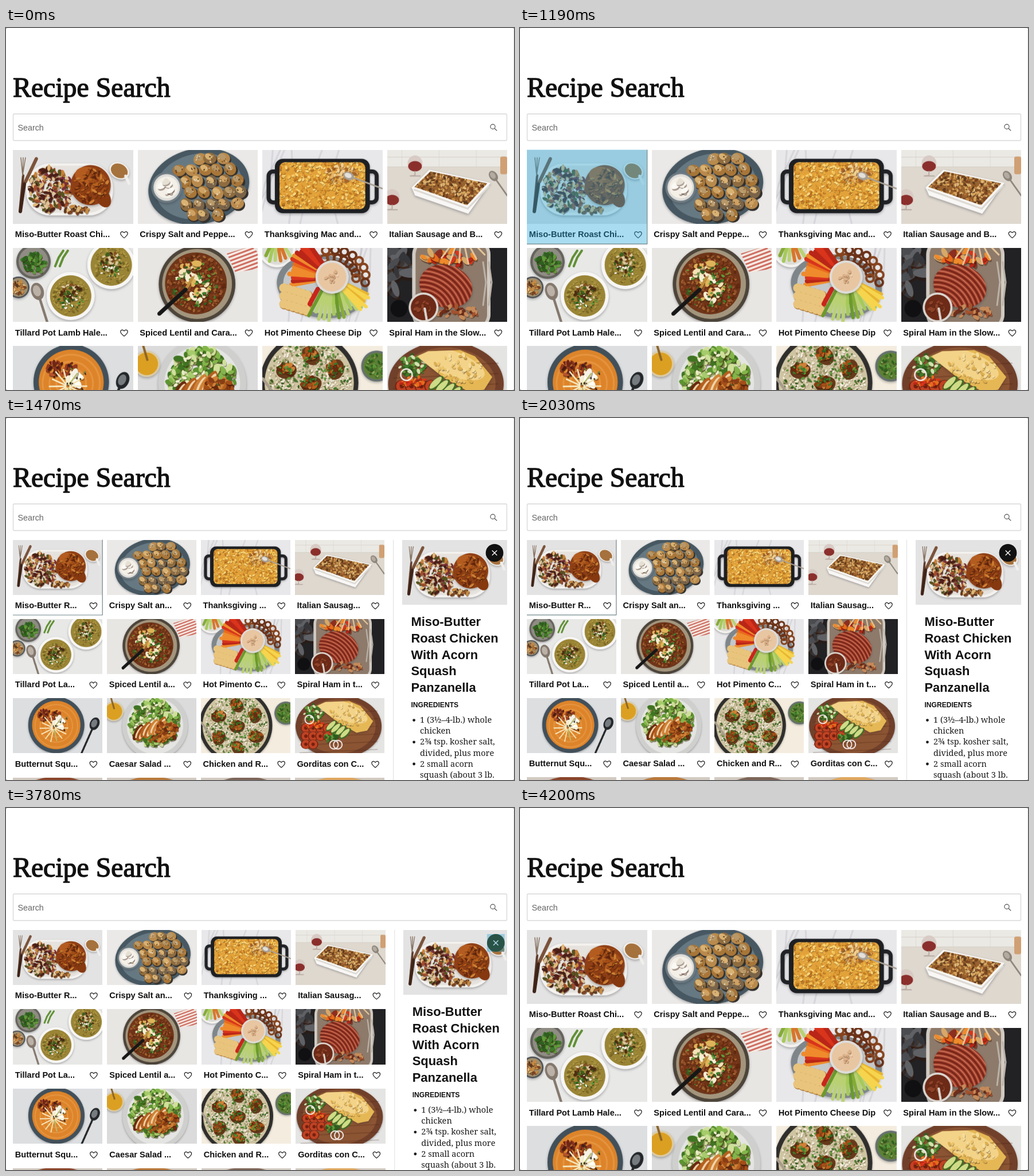
An HTML page with a canvas for the animation above (4830 ms loop, 886 by 632 pixels).

```html
<!DOCTYPE html>
<html lang="en">
<head>
<meta charset="utf-8">
<title>Recipe Search</title>
<style>
html, body { margin: 0; width: 100%; height: 100%; overflow: hidden; background: #fff; }
canvas { display: block; width: 886px; height: 632px; }
</style>
</head>
<body>
<canvas id="stage" width="886" height="632"></canvas>
<script>
const stage = document.getElementById('stage').getContext('2d');
const LOOP = 4830, STEP = 70, TAU = Math.PI * 2;
const SANS = '"Liberation Sans", Arial, sans-serif';
const SERIF = '"Noto Serif", Georgia, serif';
let c = stage, seed = 1;

// ---- basic shapes ----
const rnd = () => (seed = (seed * 16807) % 2147483647) / 2147483647;
const pick = list => list[Math.floor(rnd() * list.length)];

function ell(x, y, rx, ry, fill, rot = 0) {
  c.fillStyle = fill;
  c.beginPath();
  c.ellipse(x, y, rx, ry, rot, 0, TAU);
  c.fill();
}
function ring(x, y, r, color, width) {
  c.strokeStyle = color;
  c.lineWidth = width;
  c.beginPath();
  c.arc(x, y, r, 0, TAU);
  c.stroke();
}
function box(x, y, w, h, r, fill) {
  c.fillStyle = fill;
  c.beginPath();
  c.roundRect(x, y, w, h, r);
  c.fill();
}
function line(color, width, ...p) {
  c.strokeStyle = color;
  c.lineWidth = width;
  c.beginPath();
  for (let i = 0; i < p.length; i += 2) c.lineTo(p[i], p[i + 1]);
  c.stroke();
}
function poly(fill, ...p) {
  c.fillStyle = fill;
  c.beginPath();
  for (let i = 0; i < p.length; i += 2) c.lineTo(p[i], p[i + 1]);
  c.fill();
}
function scoped(draw) {
  c.save();
  draw();
  c.restore();
}
function shadow(draw) {
  scoped(() => {
    c.shadowColor = 'rgba(40,40,50,.35)';
    c.shadowBlur = 9;
    c.shadowOffsetY = 4;
    draw();
  });
}

// ---- kitchen parts, on a 210 x 129.5 plane ----
const W = 210, H = 129.5;
const herbs = ['#3f7a2a', '#5f9a3a', '#2f5f20'];
const roasted = ['#8a3d14', '#b5601f', '#cf8136', '#6b2a0e', '#a44e18'];
const golden = ['#f4c355', '#eeb040', '#c97c22', '#f9d67c', '#dc9630'];
const crust = ['#c48a45', '#7c4522', '#dfb777', '#a3622c', '#5d3a1e'];
const reds = ['#d9341c', '#e86b1d', '#b92617', '#ef8b2c'];
const creams = ['#f5eddb', '#fbf6ea', '#e6d3a8'];
const greens = ['#86ab38', '#b9d173', '#6b9a2c', '#a6c95a'];

function table(color) {
  box(0, 0, W, H, 0, color);
}
function marble() {
  table('#e8e8ea');
  for (let i = 0; i < 6; i++) {
    const x = rnd() * W;
    line('rgba(150,150,165,.22)', 3, x, 0, x + 20 - rnd() * 50, 60, x - rnd() * 50, H);
  }
}
// random pieces inside an ellipse, each with a dark lower edge
function heap(n, x, y, rx, ry, size, colors, flat = 0.6) {
  for (let i = 0; i < n; i++) {
    const a = rnd() * TAU, d = Math.sqrt(rnd()), s = size * (0.6 + rnd() * 0.7);
    const px = x + Math.cos(a) * d * rx, py = y + Math.sin(a) * d * ry, rot = rnd() * 3;
    ell(px + s * 0.15, py + s * 0.3, s, s * flat, 'rgba(50,20,5,.4)', rot);
    ell(px, py, s, s * flat, pick(colors), rot);
  }
}
// sticks laid out like rays between two angles
function fan(n, x, y, near, far, from, to, width, colors) {
  for (let i = 0; i < n; i++) {
    const a = from + (to - from) * i / (n - 1), r = far * (0.9 + rnd() * 0.2);
    line(pick(colors), width, x + Math.cos(a) * near, y + Math.sin(a) * near, x + Math.cos(a) * r, y + Math.sin(a) * r);
  }
}
function plate(x, y, rx, ry, rim, fill, rot = 0) {
  shadow(() => ell(x, y, rx, ry, rim, rot));
  ell(x, y, rx * 0.86, ry * 0.86, fill, rot);
}
const bowl = (x, y, r, rim, fill) => plate(x, y, r, r, rim, fill);
function spoon(x, y, x2, y2, size, dark, light) {
  const rot = Math.atan2(y2 - y, x2 - x);
  line(dark, size * 0.4, x, y, x2, y2);
  ell(x, y, size * 1.4, size, dark, rot);
  ell(x - 1, y - 1, size * 0.9, size * 0.6, light, rot);
}
function glass(x, y) {
  ell(x, y - 5, 13, 14, 'rgba(215,200,195,.9)');
  ell(x, y, 12, 9, '#8b2f2c');
  line('#b9aaa2', 2, x, y + 9, x, y + 16, x - 9, y + 17, x + 9, y + 17);
}

const dishes = [
  function roast() {
    table('#e4e3e3');
    shadow(() => box(23, 24, 152, 91, 42, '#f4f2ef'));
    box(28, 28, 142, 82, 38, '#e6e2dd');
    line('#5b3a28', 4, 18, 45, 12, 108);
    for (const x of [14, 18, 22]) line('#84705f', 1.5, x, 14, 17, 45);
    line('#7a523a', 6, 41, 16, 22, 56);
    line('#3f2418', 6, 20, 60, 13, 108);
    heap(260, 66, 70, 38, 39, 4.6, ['#c98236', '#7b2f38', '#565420', '#e0b878', '#a04c2a', '#4c2018', '#ddc49c'], 0.5);
    heap(30, 110, 105, 22, 6, 4, crust);
    shadow(() => ell(136, 62, 35, 35, '#8f3f15', 0.3));
    ell(158, 84, 12, 18, '#86380f', -0.5);
    ell(134, 48, 26, 17, '#b45c20', 0.3);
    heap(110, 137, 62, 30, 30, 4.5, roasted, 0.4);
    plate(186, 37, 18, 14, '#f6f4f1', '#a5713c', 0.5);
    line('#f1efec', 5, 197, 46, 203, 59);
  },
  function potatoes() {
    table('#eae9e7');
    plate(107, 64, 89, 66, '#475862', '#667983', -0.2);
    for (let row = 0; row < 6; row++) for (let col = 0; col < 6; col++) {
      const x = 60 + col * 22 + (row % 2) * 10 + rnd() * 5, y = 13 + row * 20 + rnd() * 4;
      if (Math.hypot((x - 122) / 64, (y - 62) / 58) > 1 || Math.hypot(x - 50, y - 66) < 33) continue;
      ell(x + 2, y + 3, 11.5, 10.5, '#33302c');
      ell(x, y, 11.5, 10, pick(['#b98a4c', '#a87638', '#8f6c3f', '#7a6449']), rnd() * 3);
      ell(x - 2, y - 3, 7, 5, pick(['#d9b273', '#cfa263', '#b89868']), 0.6);
      heap(5, x, y, 8, 7, 1.4, ['#5c4024', '#efe0c4']);
    }
    bowl(51, 66, 27, '#6d7a82', '#dfddd9');
    ell(51, 66, 20, 19, '#f4f0e8');
    heap(9, 51, 66, 10, 10, 7, ['#f4f0e8', '#fbf9f4', '#e6e0d4']);
  },
  function macaroni() {
    marble();
    for (const x of [11, 176]) shadow(() => {
      c.strokeStyle = '#202225';
      c.lineWidth = 7;
      c.beginPath();
      c.roundRect(x, 38, 24, 54, 8);
      c.stroke();
    });
    shadow(() => box(22, 16, 166, 95, 14, '#1d1f22'));
    scoped(() => {
      box(30, 22, 150, 82, 10, '#e2a23a');
      c.clip();
      heap(900, 105, 63, 96, 58, 2.9, golden);
      heap(90, 140, 43, 28, 16, 3.5, ['#e6b565', '#a96326', '#f0d091', '#c9853c']);
    });
    spoon(151, 46, W, 68, 7, '#a89f94', '#e4e0da');
  },
  function bake() {
    table('#ded8cf');
    box(0, 0, W, 30, 0, '#ebe9e4');
    for (let x = 26; x < W; x += 65) line('#dcd9d2', 1, x, 0, x, 30);
    for (const y of [13, 30]) line('#d5d0c8', 1, 0, y, W, y);
    glass(49, 29);
    glass(9, 88);
    box(198, 12, 12, 31, 3, '#d0a074');
    spoon(186, 46, W, 80, 7, '#8d857b', '#b3aba0');
    shadow(() => poly('#f8f7f5', 43, 66, 74, 35, 181, 58, 142, 112, 49, 80));
    line('#dcd8d2', 3, 48, 70, 141, 103, 178, 64);
    scoped(() => {
      poly('#96622f', 48, 65, 76, 38, 175, 59, 140, 97);
      c.clip();
      heap(520, 111, 67, 68, 36, 2.9, [...crust, '#d8a55c']);
    });
  },
  function soups() {
    table('#e8e8e7');
    bowl(36, 24, 30, '#65635d', '#8f8c84');
    heap(70, 37, 26, 20, 17, 4.5, herbs);
    for (const x of [96, 88]) line('#5f8f32', 4, x, 5, x - 8, 17, x - 14, 32);
    for (const [x, y] of [[172, 30], [101, 84]]) {
      bowl(x, y, 42, '#f7f6f4', '#9a8536');
      heap(130, x, y, 31, 31, 2.6, ['#b39c48', '#7d6c26', '#a8913c']);
      heap(55, x, y - 5, 19, 16, 3.4, ['#4f2d12', '#81501f', '#3f5f1e', '#d9c79b']);
      heap(26, x, y + 9, 22, 13, 2.4, ['#f4f0e4', '#f4f0e4', ...herbs]);
    }
    bowl(10, 69, 19, '#4f5357', '#a08d6c');
    heap(45, 10, 69, 12, 12, 3, crust);
    spoon(43, 76, 60, H, 11, '#84786d', '#bbb1a7');
  },
  function lentils() {
    table('#e8e6e3');
    bowl(104, 63, 67, '#4d453a', '#a3957d');
    ell(104, 63, 61, 61, '#a3957d');
    ell(102, 62, 54, 54, '#6f3519');
    heap(420, 102, 62, 50, 50, 3, ['#93502a', '#62290f', '#a3642f', '#7d3a1a']);
    heap(26, 98, 61, 32, 35, 7.5, ['#f3e3b8', '#f8eed2', '#dfb45a']);
    heap(90, 100, 62, 44, 43, 3, [...herbs, '#7a3416']);
    line('#c08f3e', 5, 96, 52, 84, 73);
    line('#171717', 7, 84, 73, 38, 115);
    scoped(() => {
      poly('#f4ebe4', 156, 10, 199, -3, 215, 12, 212, 36, 171, 43);
      c.clip();
      for (let y = 0; y < 70; y += 7) line('#cf6c60', 3, 145, y + 8, 215, y - 18);
    });
  },
  function dip() {
    marble();
    bowl(26, 2, 32, '#f3f2ef', '#dcdcd8');
    fan(6, 24, -25, 20, 46, 1, 2, 6, [...greens, '#d7762c']);
    plate(105, 67, 80, 55, '#7f868a', '#c5c8c9', 0.15);
    for (let i = 0; i < 16; i++) {
      const a = -1.9 + i * 0.14, r = 42 + (i % 2) * 17;
      ring(122 + Math.cos(a) * r, 51 + Math.sin(a) * r * 0.8, 6.5, pick(['#6b3218', '#86441f']), 4);
    }
    fan(14, 122, 51, 32, 74, 2.95, 4.1, 8, reds);
    for (let row = 0; row < 3; row++) for (let i = 0; i < 6; i++) {
      const x = 38 + i * 8, y = 70 + row * 14 + i * 2.4;
      ell(x + 1, y + 1, 9, 8.5, '#a8712c');
      ell(x, y, 8.5, 8, '#e9c47c');
    }
    fan(12, 122, 40, 36, 82, 0.9, 2.05, 6, [...greens, '#df8527']);
    fan(7, 122, 51, 30, 75, 0.45, 0.85, 6, ['#f6d44e', '#e8b530']);
    line('#c9251b', 8, 97, 72, 83, 98);
    bowl(122, 51, 29, '#dedcd9', '#e8c6a1');
    heap(12, 121, 50, 14, 12, 3, ['#dcb087', '#efd2b3']);
  },
  function ham() {
    table('#222224');
    heap(24, 18, 40, 26, 45, 16, ['#4a4c50', '#5f6165', '#35363a'], 0.4);
    box(44, -16, 137, 160, 28, '#d0cac2');
    box(50, -12, 125, 152, 24, '#8d7a6a');
    heap(30, 110, 18, 52, 13, 9, [...reds, '#d8a868', '#8c2e20'], 0.5);
    fan(6, 130, -30, 30, 62, 0.8, 2.2, 3, ['#e3c49a']);
    scoped(() => {
      shadow(() => ell(103, 67, 47, 37, '#9a3a28', 0.3));
      c.clip();
      for (let i = 0; i < 26; i++) ring(60, 120, 20 + i * 4, i % 2 ? '#c96f55' : '#6f2015', 2);
    });
    for (const x of [168, 178]) line('#b9b2a8', 3, x, 25, x + 5, 60, x, 100);
    heap(40, 125, 112, 38, 10, 5, ['#6f2e1c', '#a5522f', '#c68a59']);
    ell(21, 106, 15, 15, '#101012');
    bowl(64, 104, 26, '#dbd6d0', '#6c2a17');
    heap(14, 62, 102, 13, 11, 4, ['#8d4228', '#6c2a17']);
    line('#dad6d0', 4, 66, 106, 70, H);
  },
  function squash() {
    table('#dcdee0');
    bowl(102, 63, 66, '#42505a', '#dd842a');
    for (let r = 14; r < 52; r += 12) ring(102, 65, r, '#e59440', 3);
    heap(50, 86, 40, 28, 13, 4.5, ['#6f2517', '#94391f', '#4d1b12', '#b5532b'], 0.5);
    heap(16, 108, 58, 12, 11, 8, ['#f6f1e8', '#fffdf6']);
    fan(14, 96, 70, 4, 30, 0, 5.8, 2.6, ['#f1e2ac', '#f6ebc4', '#b9bd6c']);
    heap(14, 100, 60, 30, 30, 2, ['#33271c', '#78863c']);
    spoon(192, 60, 161, H, 11, '#24272a', '#767b80');
  },
  function caesar() {
    table('#dbdbdb');
    bowl(16, 31, 23, '#dccba4', '#dba022');
    line('#8e6426', 4, 10, 0, 17, 24);
    bowl(113, 65, 77, '#cfd0ce', '#e4e5e2');
    heap(260, 112, 58, 58, 54, 7.5, ['#5d9430', '#83b54b', '#3f7422', '#a6cb6c', '#cfe09a']);
    heap(50, 100, 50, 46, 42, 4, ['#e6ecc0', '#f0ecd0', '#487c28']);
    for (let i = 0; i < 7; i++) {
      const x = 73 + i * 9, y = 80 - i * 3 + (i % 2) * 5;
      ell(x, y, 8, 21, pick(roasted), 0.5);
      ell(x + 2, y, 4.5, 16, '#efd5ab', 0.5);
    }
    heap(70, 142, 75, 24, 20, 6, roasted);
    heap(25, 120, 97, 24, 9, 5, roasted);
  },
  function rice() {
    table('#f4eddf');
    bowl(82, 64, 86, '#302f2d', '#cfc4a2');
    ell(82, 64, 78, 78, '#cfc4a2');
    heap(800, 82, 64, 74, 74, 2.6, ['#f3edda', '#f3edda', '#e3d8b8', '#a5a070', '#527734']);
    for (let i = 0; i < 7; i++) {
      const a = i * TAU / 6 + 0.5, r = i < 6 ? 50 : 0, x = 84 + Math.cos(a) * r, y = 64 + Math.sin(a) * r;
      ell(x + 2, y + 3, 18, 14, '#65391b', i);
      heap(26, x, y, 12, 9, 6, roasted);
      heap(10, x, y, 14, 10, 2.6, herbs);
    }
    heap(130, 82, 64, 72, 70, 2.6, herbs);
    line('#a89d8c', 5, 1, 57, 24, 88);
    bowl(200, 35, 27, '#667170', '#5d8036');
    heap(60, 200, 35, 19, 20, 3, [...herbs, '#86a755']);
  },
  function gorditas() {
    table('#e4e4e3');
    plate(103, 66, 101, 74, '#71402a', '#8b5433');
    for (let y = 30; y < H; y += 18) line('rgba(60,28,15,.25)', 2, 12, y + 8, 194, y);
    heap(70, 44, 33, 23, 19, 4.5, ['#d5e1b0', ...herbs]);
    scoped(() => {
      c.lineJoin = 'round';
      shadow(() => poly('#e6b855', 52, 18, 72, 9, 128, 7, 154, 18, 184, 54, 170, 76, 145, 81, 100, 56));
      c.clip();
      ell(112, 30, 62, 22, '#f3d388', 0.35);
      heap(60, 125, 40, 50, 26, 4, ['#ecc46a', '#f6dc98', '#dcae50']);
    });
    for (let i = 0; i < 10; i++) {
      const x = 26 + (i % 4) * 17, y = 70 + Math.floor(i / 4) * 19;
      ell(x, y, 12, 11, '#74200f');
      ring(x, y, 7, '#bf4324', 6);
    }
    heap(36, 44, 62, 24, 9, 4, reds);
    for (let i = 0; i < 4; i++) {
      ell(86 + i * 11, 65 + i * 6, 7, 17, '#426b25', 0.8);
      ell(85 + i * 11, 64 + i * 6, 5, 14, '#cfdb86', 0.8);
    }
    heap(40, 85, 93, 17, 9, 4, herbs);
    for (const x of [34, 92, 101]) ring(x, x < 50 ? 50 : 109, 10, '#f4ebea', 2.5);
  },
  ...['#8a452b', '#b9793c', '#7d6659', '#dfa860'].map(color => () => {
    table('#d3cbc2');
    plate(105, 40, 85, 42, color, color);
  })
];

const photos = dishes.map((draw, i) => {
  const cv = document.createElement('canvas');
  cv.width = W * 2;
  cv.height = H * 2;
  c = cv.getContext('2d');
  c.scale(2, 2);
  c.lineCap = 'round';
  seed = 7919 * (i + 1);
  draw();
  return cv;
});
c = stage;
c.imageSmoothingQuality = 'high';

// bars mark where a title is cut on narrow and middle-sized cards
const titles = [
  'Miso-Butter R|oast C|hi...', 'Crispy Salt an|d Pepp|e...', 'Thanksgiving |Mac a|nd...', 'Italian Sausag|e and |B...',
  'Tillard Pot La|mb Ha|le...', 'Spiced Lentil a|nd Ca|ra...', 'Hot Pimento C|heese| Dip', 'Spiral Ham in t|he Sl|ow...',
  'Butternut Squ|ash So|up...', 'Caesar Salad |With C|hi...', 'Chicken and R|ice W|it...', 'Gorditas con C|amaro|ne...'
].map(s => s.split('|'));
const WIDE = 209.5, MID = 196.9, NARROW = 155.6;

function label([a, b, end], w) {
  if (w > WIDE - 0.1) return a + b + end;
  const k = w < MID ? (w - NARROW) / (MID - NARROW) : (w - MID) / (WIDE - MID);
  const [head, tail] = w < MID ? [a, b] : [a + b, end.replace('...', '')];
  return head + tail.slice(0, Math.floor(k * tail.length + 0.05)) + '...';
}

function text(s, x, y, font, color = '#111') {
  c.font = font;
  c.fillStyle = color;
  c.fillText(s, x, y);
}

function heart(x, y) {
  c.beginPath();
  c.moveTo(x, y + 5.6);
  for (const s of [-1, 1]) {
    c.moveTo(x, y + 5.6);
    c.bezierCurveTo(x + s * 3, y + 3, x + s * 6.2, y + 0.8, x + s * 6.2, y - 2.2);
    c.bezierCurveTo(x + s * 6.2, y - 6, x + s * 1.6, y - 6.6, x, y - 3.2);
  }
  c.strokeStyle = '#1a1a1a';
  c.lineWidth = 1.2;
  c.stroke();
}

function header() {
  c.lineJoin = 'round';
  text('Recipe Search', 12, 120, '47.8px "Liberation Serif", "Times New Roman", serif');
  c.strokeStyle = '#111';
  c.lineWidth = 1.4;
  c.strokeText('Recipe Search', 12, 120);
  c.strokeStyle = '#d8d8d8';
  c.lineWidth = 1.3;
  c.beginPath();
  c.roundRect(12.5, 150, 861, 46.5, 2);
  c.stroke();
  text('Search', 20.5, 178.5, '14.3px ' + SANS, '#666');
  ring(849, 172.3, 4.1, '#555', 1.2);
  line('#555', 1.3, 852, 175.3, 856.3, 179.4);
}

const TOP = 212.5, TINT = 'rgba(42,167,217,.4)';

function grid(right, pressed, focused) {
  const w = (right - 36) / 4, h = w * 0.617;
  photos.forEach((photo, i) => {
    const x = 12 + (i % 4) * (w + 8), y = TOP + Math.floor(i / 4) * (h + 42.2);
    c.drawImage(photo, x, y, w, h);
    if (!titles[i]) return;
    text(label(titles[i], w), x + 3.8, y + h + 23.4, 'bold 14.6px ' + SANS);
    heart(x + w - 15.5, y + h + 19.3);
  });
  const bottom = TOP + h + 35.3;
  if (pressed) box(12, TOP, w, bottom - TOP, 0, TINT);
  if (focused) line('#71868a', 1.2, 12, bottom, 12.3 + w, bottom, 12.3 + w, TOP);
}

const heading = ['Miso-Butter', 'Roast Chicken', 'With Acorn', 'Squash', 'Panzanella'];
const items = ['1 (3½–4-lb.) whole', 'chicken', '2¾ tsp. kosher salt,', 'divided, plus more', '2 small acorn', 'squash (about 3 lb.'];

function panel(right, alpha, pressed) {
  const x = right + 31.5, bx = x + 161, by = 235.5, r = 15.4;
  c.save();
  c.beginPath();
  c.rect(0, 200, 874, 432);
  c.clip();
  c.globalAlpha = alpha;
  line('#dedede', 1, right + 16, TOP, right + 16, 632);
  c.drawImage(photos[0], x, TOP, 184, 113.5);
  heading.forEach((s, i) => text(s, x + 15.4, 363.2 + i * 28.75, 'bold 21.9px ' + SANS));
  text('INGREDIENTS', x + 15.4, 505.2, 'bold 12.1px ' + SANS);
  items.forEach((s, i) => {
    const y = 532.2 + i * 19.1;
    text(s, x + 31, y, '14.5px ' + SERIF, '#1a1a1a');
    if (i % 2 === 0) ell(x + 20.5, y - 4.6, 2.4, 2.4, '#1a1a1a');
  });
  if (pressed) box(bx - r, by - r, r * 2, r * 2, 0, TINT);
  ell(bx, by, r, r, pressed ? '#2a5348' : '#111');
  for (const s of [-4.3, 4.3]) line(pressed ? '#b5dfe8' : '#fff', 1.3, bx - s, by - 4.3, bx + s, by + 4.3);
  c.restore();
}

function ease(p) {
  p = Math.min(1, Math.max(0, p));
  return p * p * (3 - 2 * p);
}

function render(now) {
  const t = Math.floor((now % LOOP) / STEP) * STEP;
  const open = ease((t - 1261) / 218) - ease((t - 3764) / 218);
  const right = 874 - 215.5 * open;
  box(0, 0, 886, 632, 0, '#a5a5a5');
  box(0, 0, 886, 632, 3, '#fff');
  line('#ececec', 1, 885.5, 3, 885.5, 629);
  header();
  grid(right, t >= 1190 && t < 1400, t >= 1190 && t < 3780);
  if (open > 0.001) panel(right, Math.min(1, open * 2), t >= 3780 && t < 3850);
}

const start = performance.now();
(function tick() {
  render(performance.now() - start);
  requestAnimationFrame(tick);
})();
</script>
</body>
</html>
```
